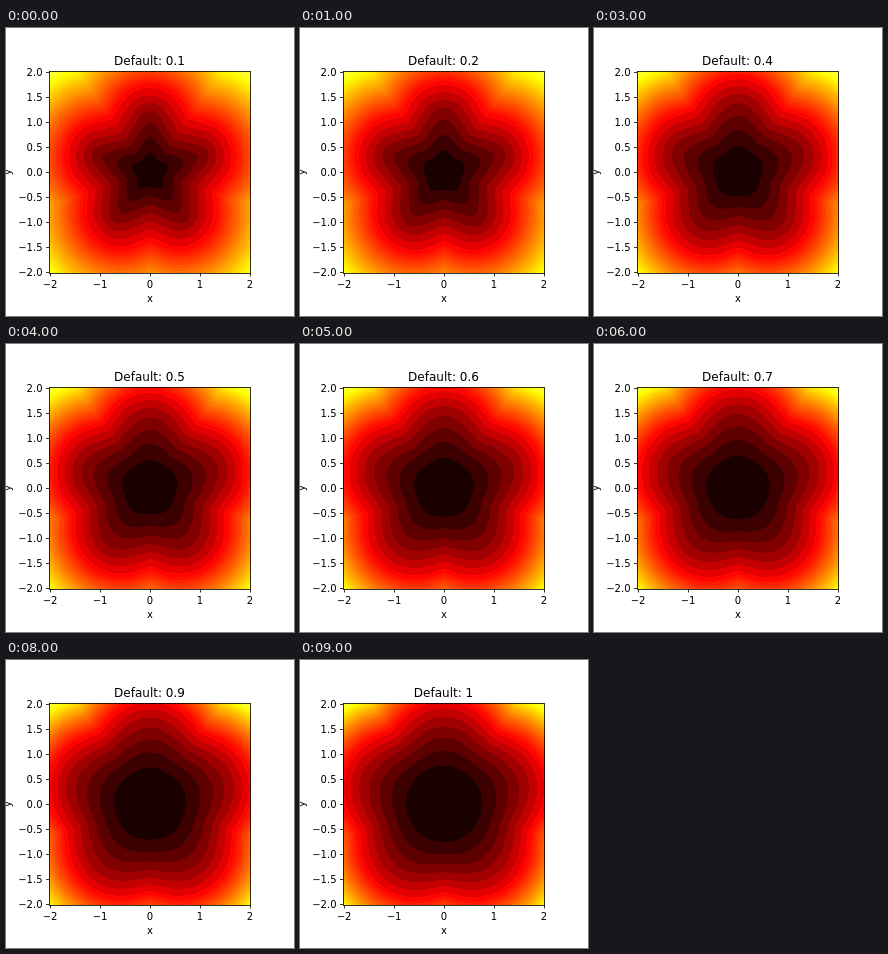
Recreate the animation shown at these times as an HTML page with a canvas. Size 288 px wide and 288 px high, loop 10000 ms.

```html
<!DOCTYPE html>
<html lang="en">
<head>
<meta charset="utf-8">
<style>
  html, body { margin: 0; width: 100%; height: 100%; overflow: hidden; background: #fff; }
  canvas { display: block; }
</style>
</head>
<body>
<canvas id="stage" width="288" height="288"></canvas>
<script>
const ctx = document.getElementById('stage').getContext('2d');
const LEFT = 43, TOP = 43, SIZE = 202, CENTER = 144, UNIT = 50;
const STEPS = 10, STEP_MS = 1000;
const ARM_COST = 0.52;

const arms = Array.from({ length: 5 }, (_, i) => {
  const angle = Math.PI / 2 + i * Math.PI * 2 / 5;
  return [Math.cos(angle), Math.sin(angle)];
});
const clamp = (v, lo = 0, hi = 1) => Math.min(hi, Math.max(lo, v));

// Rounded travel time from the centre, with cheap travel along five unit arms.
function travel(x, y, soft) {
  let best = Infinity;
  for (const [ax, ay] of arms) {
    const along = x * ax + y * ay;
    const across = x * ay - y * ax;
    const lag = ARM_COST * Math.hypot(across, soft) / Math.sqrt(1 - ARM_COST ** 2);
    const s = clamp(along - lag);
    best = Math.min(best, Math.hypot(along - s, across, soft) + ARM_COST * s);
  }
  return best - soft;
}

// Black - red - yellow - white heat scale, coarser in the dark part.
function heat(v) {
  const levels = v < 0.365 ? 20 : 50;
  const q = (Math.floor(v * levels) + 0.5) / levels;
  return [
    0.0416 + 0.9584 * clamp(q / 0.365),
    clamp((q - 0.365) / 0.381),
    clamp((q - 0.746) / 0.254)
  ].map(c => Math.round(c * 255));
}

function field(soft) {
  const image = ctx.createImageData(SIZE, SIZE);
  const top = travel(2, 2, soft);
  const power = 1.05 + 0.4 * soft;
  for (let row = 0, at = 0; row < SIZE; row++) {
    for (let col = 0; col < SIZE; col++, at += 4) {
      const x = (LEFT + col + 0.5 - CENTER) / UNIT;
      const y = (CENTER - TOP - row - 0.5) / UNIT;
      const v = 0.82 * (travel(x, y, soft) / top) ** power;
      image.data.set([...heat(v), 255], at);
    }
  }
  return image;
}

function label(text, x, y, align = 'center', size = 10) {
  ctx.font = `${size}px "DejaVu Sans", sans-serif`;
  ctx.textAlign = align;
  ctx.fillText(text, x, y);
}

function drawAxes() {
  ctx.strokeStyle = ctx.fillStyle = '#000';
  ctx.lineWidth = 0.8;
  ctx.strokeRect(LEFT + 0.5, TOP + 0.5, SIZE - 1, SIZE);
  ctx.beginPath();
  for (let i = -4; i <= 4; i++) {
    const y = CENTER - i * 25;
    ctx.moveTo(40, y + 0.5);
    ctx.lineTo(43, y + 0.5);
    label((i / 2).toFixed(1).replace('-', '−'), 36.5, y + 4, 'right');
  }
  for (let i = -2; i <= 2; i++) {
    const x = CENTER + i * UNIT;
    ctx.moveTo(x + 0.5, 245);
    ctx.lineTo(x + 0.5, 248.5);
    label(String(i).replace('-', '−'), x, 260);
  }
  ctx.stroke();
  label('x', 144, 274);
  ctx.save();
  ctx.translate(5, 144);
  ctx.rotate(-Math.PI / 2);
  label('y', 0, 0);
  ctx.restore();
}

const fields = Array.from({ length: STEPS }, (_, i) => field((i + 1) / STEPS));
let shown = -1;

function draw(now) {
  const step = Math.floor(now / STEP_MS) % STEPS;
  if (step !== shown) {
    shown = step;
    ctx.fillStyle = '#fff';
    ctx.fillRect(0, 0, 288, 288);
    ctx.putImageData(fields[step], LEFT, TOP);
    drawAxes();
    label(`Default: ${(step + 1) / STEPS}`, 143.5, 37, 'center', 12);
  }
  requestAnimationFrame(draw);
}
draw(performance.now());
</script>
</body>
</html>
```
